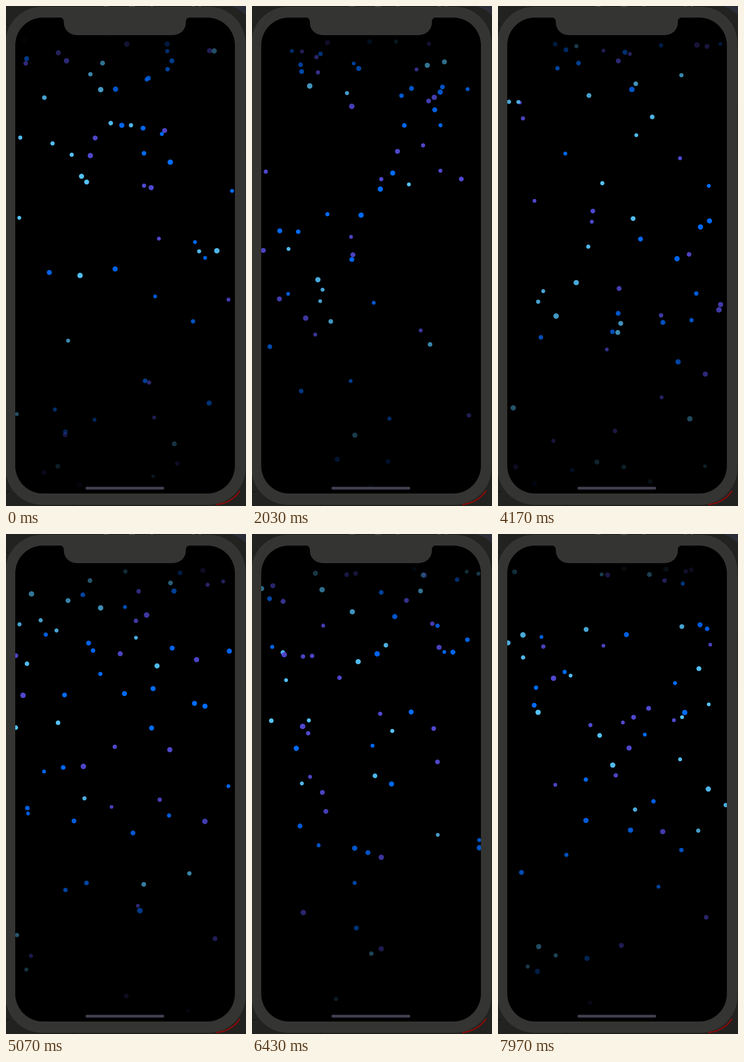
Animation of 519x1080 px, one loop 8 s. Source, as an HTML page with a canvas:

```html
<!DOCTYPE html>
<html lang="en">
<head>
<meta charset="utf-8">
<title>Falling dots</title>
<style>
  html, body { margin: 0; width: 100%; height: 100%; overflow: hidden; background: #222221; }
  svg, canvas { position: absolute; left: 0; top: 0; display: block; }
  canvas { left: 20px; top: 25px; background: #000; border-radius: 60px; }
</style>
</head>
<body>
<svg width="519" height="1080" viewBox="0 0 519 1080">
  <rect width="519" height="1080" fill="#222221"/>
  <path d="M486 0H519V20Q505 6 486 0Z" fill="#2b2d38"/>
  <path d="M211 .5H222M266 1H279M312 .5H318M402 .5H408M417 .5H422" stroke="#66666a"/>
  <path d="M0 39H5M0 1049H8M147.500 1076V1080" stroke="#090909"/>
  <path d="M455 1077Q489 1073 506 1047" fill="none" stroke="#8a0c08" stroke-width="3"/>
  <rect x="515" y="210" width="4" height="117" rx="1.500" fill="#202021"/>
  <rect x="-.5" y="2.500" width="517.500" height="1074" rx="78" fill="#343432" stroke="#3a3a34"/>
</svg>
<canvas id="screen" width="475" height="1028"></canvas>
<svg width="519" height="1080" viewBox="0 0 519 1080">
  <path d="M116 24V25Q125 25 125 34C125 52 137 63 156 63H358C377 63 389 52 389 34Q389 25 398 25V24Z" fill="#343432"/>
  <rect x="172" y="1038.500" width="170" height="6" rx="3" fill="#433f50"/>
</svg>
<script>
const LOOP = 8000, FPS = 30, COUNT = 68;
const WIDTH = 475, HEIGHT = 1028;
const START = 50, DROP = 985;
const COLORS = ['#54c2f8', '#006cff', '#5048d0'];

// Seeded random number in [0, 1) for one property of one fall.
function random(slot, cycle, key) {
  let h = Math.imul(slot + 1, 0x9e3779b1) ^ Math.imul(cycle + 1, 0x85ebca6b) ^ Math.imul(key + 1, 0xc2b2ae35);
  h = Math.imul(h ^ (h >>> 16), 0x7feb352d);
  h = Math.imul(h ^ (h >>> 15), 0x846ca68b);
  return ((h ^ (h >>> 16)) >>> 0) / 2 ** 32;
}

// Ease-in, cubic-bezier(.42, 0, 1, 1): find the curve parameter by bisection.
function easeIn(time) {
  let low = 0, high = 1;
  for (let i = 0; i < 18; i++) {
    const s = (low + high) / 2;
    const at = 1.26 * s * (1 - s) ** 2 + 3 * s * s * (1 - s) + s ** 3;
    if (at < time) low = s; else high = s;
  }
  return low * low * (3 - 2 * low);
}

const ctx = document.getElementById('screen').getContext('2d');

function drawDot(slot, seconds) {
  const duration = 1.05 + .65 * Math.sqrt(random(slot, 0, 0));
  const age = random(slot, 0, 1) + seconds / duration;
  const cycle = Math.floor(age), time = age - cycle;
  const x = WIDTH * random(slot, cycle, 2);
  const radius = 4 + 2 * random(slot, cycle, 3);
  ctx.globalAlpha = 4 * time * (1 - time);
  ctx.fillStyle = COLORS[Math.floor(3 * random(slot, cycle, 4))];
  ctx.beginPath();
  ctx.arc(x, START + DROP * easeIn(time), radius, 0, 2 * Math.PI);
  ctx.fill();
}

function draw() {
  const ms = performance.now() % LOOP;
  const seconds = Math.floor((ms + 4) * FPS / 1000) / FPS;
  ctx.clearRect(0, 0, WIDTH, HEIGHT);
  for (let slot = 0; slot < COUNT; slot++) drawDot(slot, seconds);
  requestAnimationFrame(draw);
}
draw();
</script>
</body>
</html>
```
